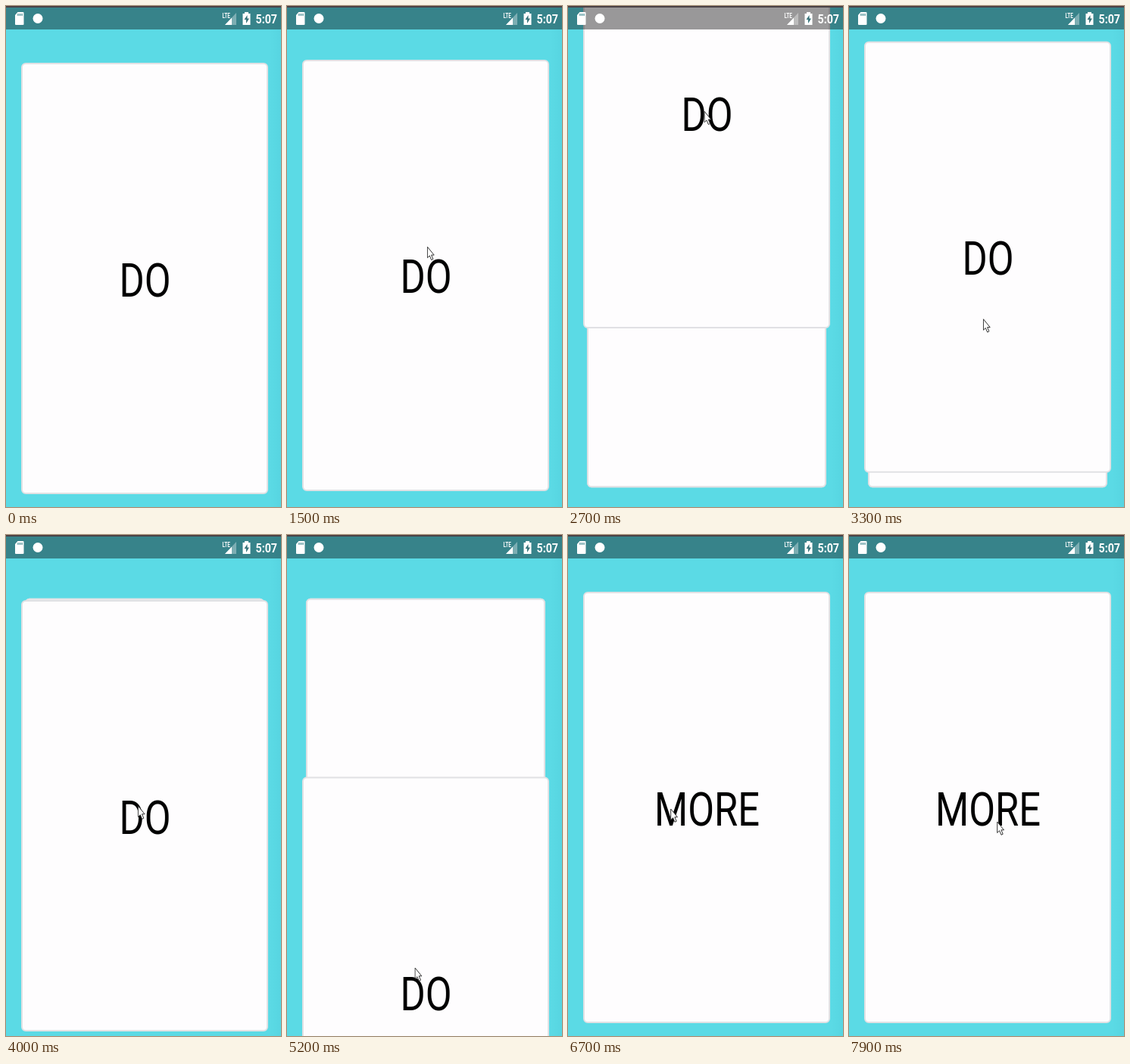
Write an HTML page that moves like this. It is 363 px wide and 662 px high and loops after 8 s.

```html
<!DOCTYPE html>
<html lang="en">
<head>
<meta charset="utf-8">
<title>Card stack</title>
<style>
  html, body { margin: 0; width: 100%; height: 100%; overflow: hidden; }
  body { background: #5bdbe6; }
  #stage {
    position: relative; width: 363px; height: 662px; overflow: hidden;
    background: linear-gradient(90deg, #5bdae5 348px, #57d5e1 363px);
    font-family: Roboto, sans-serif;
  }
  .card {
    position: absolute; left: 19.5px; top: 74.5px; width: 326px; height: 570px;
    box-sizing: border-box; border: 2px solid #e1e1e4; border-radius: 6px;
    background: #fefdfe;
  }
  svg { position: absolute; left: 0; top: 0; }
  .card svg { left: -2px; top: -2px; }
  #cursor { width: 12px; height: 20px; }
</style>
</head>
<body>
<div id="stage">
  <div class="card" id="last"></div>
  <div class="card" id="next">
    <svg width="326" height="570"><text transform="translate(163.500 308.500) scale(.836 1)" font-size="60.500" text-anchor="middle">MORE</text></svg>
  </div>
  <div class="card" id="first">
    <svg width="326" height="570"><text transform="translate(163.500 308.500) scale(.836 1)" font-size="60.500" text-anchor="middle">DO</text></svg>
  </div>
  <svg width="363" height="662" fill="#fff">
    <rect width="363" height="31" fill="#000" fill-opacity=".4"/>
    <rect width="363" height="2" fill="#4b4145"/>
    <path d="M15.500 8H22.500Q23.500 8 23.500 9V24Q23.500 25 22.500 25H13Q12 25 12 24V12Z"/>
    <path d="M16 10v3M18.500 10v3M21 10v3" stroke="#37838a" stroke-width="1.200"/>
    <circle cx="42" cy="16.500" r="6.500"/>
    <path d="M304 9V25H289Z" fill-opacity=".35"/>
    <path d="M298 15.500V25H289Z"/>
    <text transform="translate(285.500 16) scale(.75 1)" font-size="8.500" font-weight="700">LTE</text>
    <path d="M315 8h5v2h2.500v15h-10V10h2.500z"/>
    <path d="M318.500 12l-4 6h2.500v5l4-6.500h-2.500z" fill="#37737a"/>
    <text transform="translate(329.500 23) scale(.836 1)" font-size="17" font-weight="600">5:07</text>
  </svg>
  <svg id="cursor" viewBox="0 0 12 20">
    <path d="M.7 1V15.500L3.600 12.700L6 18.300L8.200 17.200L5.900 11.800H9.500Z" fill="#fff" stroke="#333" stroke-width="1"/>
  </svg>
</div>
<script>
  const LOOP = 8000, STEP = 100, BACK = 0.969;
  const LAG = 200; // the cards trail the pointer by this much

  const el = id => document.getElementById(id);
  const first = el('first'), next = el('next'), last = el('last'), cursor = el('cursor');

  const progress = (t, from, to) => Math.min(1, Math.max(0, (t - from) / (to - from)));

  // Distance covered by time t of one eased move
  function glide(t, from, to, distance) {
    const k = progress(t, from, to);
    return distance * k * k * (3 - 2 * k);
  }

  // Up, further up, back down past rest, pause, then a long pull down
  const dragFirst = t =>
    glide(t, 1400, 2100, -73) + glide(t, 2300, 2700, -146) +
    glide(t, 2800, 3700, 327) + glide(t, 3700, 4000, -97) +
    glide(t, 4200, 4800, 289) + glide(t, 4800, 5400, -75) +
    glide(t, 5400, 5600, 51);

  const dragNext = t => glide(t, 7000, 7300, 180) - glide(t, 7400, 7700, 180);

  const pointerX = t =>
    364 + glide(t, 0, 800, -178) - 23 * progress(t, 1200, 6400) +
    glide(t, 6400, 6700, -28) + glide(t, 6800, 7900, 60);

  const pointerY = t =>
    230 + glide(t, 0, 800, 116) + dragFirst(t + LAG) +
    glide(t, 6400, 6700, -261) + dragNext(t + LAG) + glide(t, 7600, 7900, 17);

  function place(card, y, scale = 1) {
    card.style.transform = `translateY(${y}px) scale(${scale})`;
  }

  function draw(t) {
    place(first, dragFirst(t) + glide(t, 5500, 5700, 350));
    place(next, dragNext(t), BACK + glide(t, 5700, 6200, 1 - BACK));
    cursor.style.transform = `translate(${pointerX(t)}px, ${pointerY(t)}px)`;
  }

  place(last, 0, BACK);
  const start = performance.now();
  function tick() {
    const t = (performance.now() - start) % LOOP;
    draw(Math.floor(t / STEP) * STEP);
    requestAnimationFrame(tick);
  }
  tick();
</script>
</body>
</html>
```
